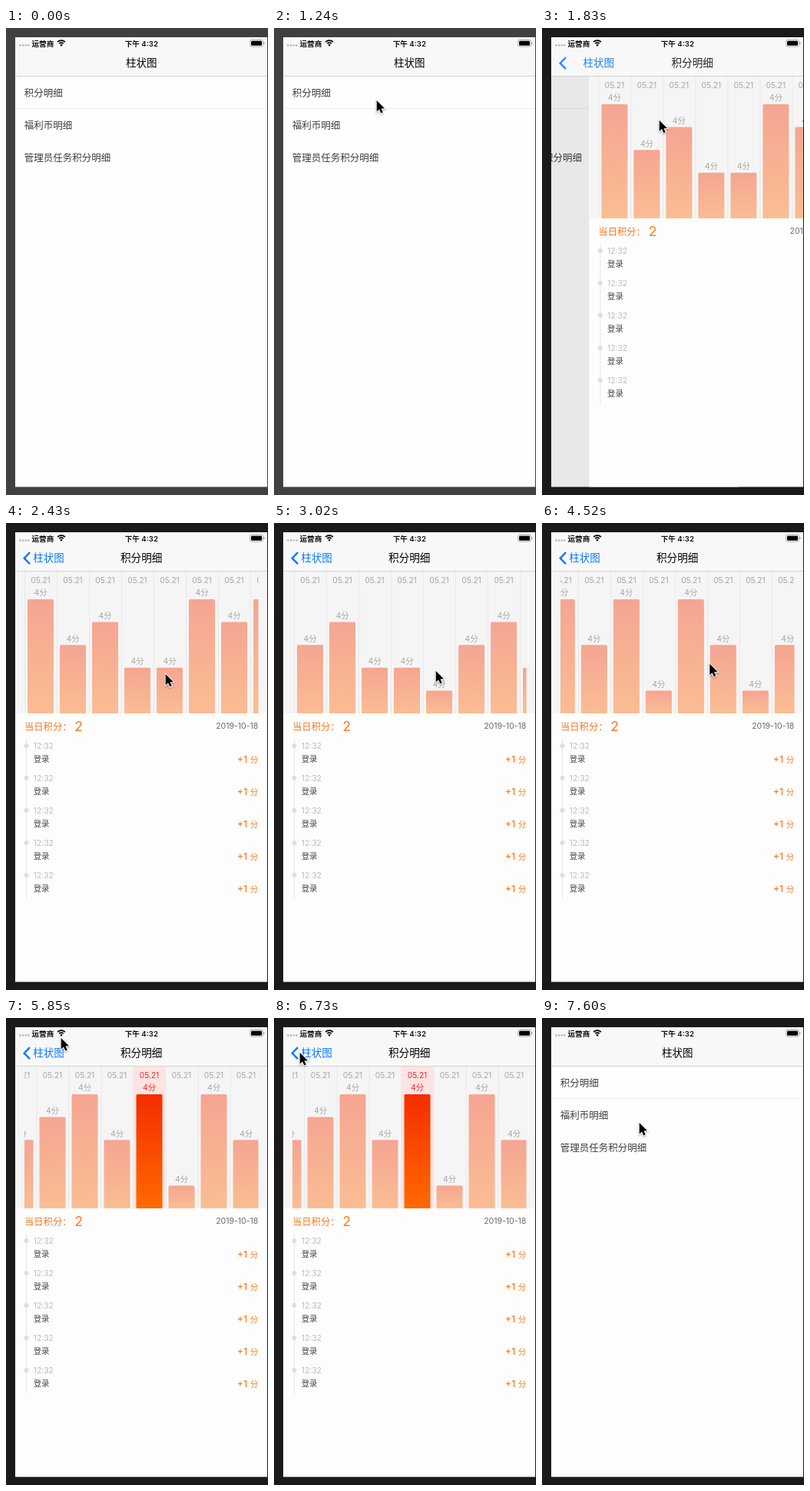
These frames come from a looping animation (341 px wide and 606 px high, 8 s). An HTML page with a canvas:

```html
<!DOCTYPE html>
<html lang="zh-CN">
<head>
<meta charset="utf-8">
<style>
html, body { margin: 0; width: 100%; height: 100%; overflow: hidden; background: #404040; }
canvas { display: block; width: 341px; height: 606px; }
</style>
</head>
<body>
<canvas id="stage"></canvas>
<script>
const W = 341, H = 606, LOOP = 8000;
const FONT = 'Inter, "Noto Sans CJK SC", "Noto Sans CJK", sans-serif';
const BLUE = '#0a7aff', ORANGE = '#fb7a1e';
const canvas = document.getElementById('stage');
const ctx = canvas.getContext('2d');
const dpr = window.devicePixelRatio || 1;
canvas.width = W * dpr;
canvas.height = H * dpr;

// Keyframes: [step, values...]; the picture advances in steps of 148 ms
const cursorKeys = [
  [0, 322, 112], [5, 133, 93], [8, 133, 93], [11, 190, 170], [13, 207, 195], [15, 207, 195],
  [17, 210, 191], [19, 130, 188], [20, 240, 188], [23, 152, 185], [28, 234, 181], [29, 234, 181],
  [32, 195, 180], [34, 195, 180], [36, 71, 25], [39, 45, 38], [41, 33, 44], [44, 33, 44], [48, 126, 135]
];
const scrollKeys = [[14, 0], [17, 334], [21, 800], [23, 1018], [24, 1005], [28, 698.5]];
const pushKeys = [[7, 0], [8, .3], [9, .85], [10, 1], [44, 1], [45, .75], [46, .15], [47, 0]];
const DARKEN = 7, SELECT = 34, PICKED = 20;
const levels = '5342254534221342345351531342435';

function tween(keys, k) {
  if (k <= keys[0][0]) return keys[0].slice(1);
  const n = keys.findIndex(key => key[0] >= k);
  if (n < 0) return keys[keys.length - 1].slice(1);
  const a = keys[n - 1], b = keys[n], f = (k - a[0]) / (b[0] - a[0]);
  return a.slice(1).map((v, i) => v + (b[i + 1] - v) * f);
}

function rect(x, y, w, h, color) {
  ctx.fillStyle = color;
  ctx.fillRect(x, y, w, h);
}

function text(str, x, y, size, color, align = 'left', weight = 400) {
  ctx.font = `${weight} ${size}px ${FONT}`;
  ctx.textAlign = align;
  ctx.fillStyle = color;
  ctx.fillText(str, x, y);
}

function dot(x, y, r, color) {
  ctx.fillStyle = color;
  ctx.beginPath();
  ctx.arc(x, y, r, 0, 7);
  ctx.fill();
}

function clipped(x, y, w, h, paint) {
  ctx.save();
  ctx.beginPath();
  ctx.rect(x, y, w, h);
  ctx.clip();
  paint();
  ctx.restore();
}

function faded(alpha, paint) {
  ctx.save();
  ctx.globalAlpha = alpha;
  paint();
  ctx.restore();
}

function drawStatus() {
  for (let i = 0; i < 4; i++) dot(18.3 + i * 3.7, 22.5, 1.3, '#b4b4b4');
  text('运营商', 33.5, 23.5, 9.6, '#111', 'left', 700);
  text('下午 4:32', 176.3, 23.5, 9.6, '#111', 'center', 600);
  ctx.strokeStyle = '#000';
  ctx.lineWidth = 1.7;
  for (const r of [3.9, 6.9]) {
    ctx.beginPath();
    ctx.arc(72, 23, r, -2.36, -.78);
    ctx.stroke();
  }
  ctx.fillStyle = '#000';
  ctx.beginPath();
  ctx.moveTo(72, 24);
  ctx.arc(72, 23.5, 2.3, -2.36, -.78);
  ctx.fill();
  ctx.strokeStyle = '#a2a2a2';
  ctx.lineWidth = .9;
  ctx.beginPath();
  ctx.roundRect(317.5, 15.3, 17, 8.8, 2.4);
  ctx.stroke();
  ctx.fillStyle = '#000';
  ctx.beginPath();
  ctx.roundRect(319, 16.7, 14, 6, 1.2);
  ctx.fill();
  rect(335.4, 18.2, 1.1, 3, '#a2a2a2');
}

function drawNav(p) {
  rect(12, 12, 328, 51, '#f8f8f8');
  rect(12, 62, 328, 1, '#d4d4d5');
  drawStatus();
  // The list title glides into the back button
  const titleX = 156 + (35.3 - 156) * p;
  faded(1 - p, () => text('柱状图', titleX, 50.2, 13.5, '#000', 'left', 500));
  faded(p, () => {
    text('柱状图', titleX, 50.2, 13.5, BLUE);
    text('积分明细', 176.2 + (1 - p) * 130, 50.2, 13.6, '#000', 'center', 500);
    ctx.strokeStyle = BLUE;
    ctx.lineWidth = 2.4;
    ctx.beginPath();
    ctx.moveTo(31, 38.2);
    ctx.lineTo(23.7, 45.7);
    ctx.lineTo(31, 53.2);
    ctx.stroke();
  });
}

function drawList() {
  rect(12, 63, 329, 533, '#fefefe');
  rect(12, 104, 329, 1, '#efefef');
  ['积分明细', '福利币明细', '管理员任务积分明细'].forEach((label, i) =>
    text(label, 23.7, 88.6 + i * 42, 12.5, '#3c3c3c'));
}

function drawColumn(i, scroll, picked) {
  const x = 24 + i * 42 - scroll, h = levels[i] * 29.6, top = 247 - h;
  rect(x, 63, 42, 184, picked ? '#fee3e2' : '#f5f5f5');
  rect(x, 63, 1, 184, '#e9e9e9');
  const color = picked ? '#e0302c' : '#a6a6a6';
  text('05.21', x + 21, 77.8, 10.2, color, 'center');
  text('4分', x + 21, top - 4.6, 10.4, color, 'center');
  const fill = ctx.createLinearGradient(0, top, 0, 247);
  fill.addColorStop(0, picked ? '#f52d00' : '#f5a592');
  fill.addColorStop(1, picked ? '#ff6a00' : '#fabd93');
  ctx.fillStyle = fill;
  ctx.beginPath();
  ctx.roundRect(x + 4, top, 34, h, [1.5, 1.5, 0, 0]);
  ctx.fill();
}

function drawDetail(scroll, selected) {
  rect(12, 63, 329, 533, '#fdfdfd');
  rect(12, 63, 329, 184, '#f5f5f5');
  clipped(24, 63, 304.5, 184, () => {
    const end = 24 + levels.length * 42 - scroll;
    rect(end, 63, 305, 184, '#e2e2e2');
    for (let i = 0; i < levels.length; i++) drawColumn(i, scroll, selected && i === PICKED);
  });
  text('当日积分：', 24, 269.2, 12.3, ORANGE);
  text('2', 89.3, 269.6, 17.5, ORANGE);
  text('2019-10-18', 328.3, 266.8, 10.5, '#6c6c6c', 'right');
  rect(26, 280, 1, 208, '#e6e6e6');
  for (let i = 0; i < 5; i++) {
    const y = 289 + i * 42;
    dot(26.5, y, 3, '#dedede');
    text('12:32', 35.7, y + 3.6, 10.3, '#bcbcbc');
    text('登录', 35.7, y + 21, 10.4, '#444');
    text('+1', 314, y + 22, 12.3, ORANGE, 'right', 500);
    text('分', 328.2, y + 21.7, 10.4, ORANGE, 'right');
  }
}

function drawCursor(x, y) {
  const shape = [[0, 0], [0, 14.4], [3.3, 11.4], [5.6, 16.6], [8, 15.6], [5.8, 10.5], [10.3, 10.3]];
  ctx.save();
  ctx.translate(x + .7, y + 1);
  ctx.beginPath();
  shape.forEach(point => ctx.lineTo(...point));
  ctx.closePath();
  ctx.shadowColor = 'rgba(0,0,0,.35)';
  ctx.shadowBlur = 2 * dpr;
  ctx.shadowOffsetY = dpr;
  ctx.strokeStyle = '#fff';
  ctx.lineWidth = 2;
  ctx.stroke();
  ctx.shadowColor = 'transparent';
  ctx.fillStyle = '#000';
  ctx.fill();
  ctx.restore();
}

function draw(ms) {
  const k = Math.floor((ms - 496) / 148);
  const [p] = tween(pushKeys, k);
  const [scroll] = tween(scrollKeys, k);
  ctx.setTransform(dpr, 0, 0, dpr, 0, 0);
  rect(0, 0, W, H, k < DARKEN ? '#404040' : '#1a1a1a');
  clipped(12, 12, 328, 583.5, () => {
    if (p < 1) {
      ctx.save();
      ctx.translate(-p * 99, 0);
      drawList();
      ctx.restore();
    }
    if (p > 0) {
      if (p < 1) rect(12, 63, 329, 533, `rgba(0,0,0,${.1 * p})`);
      ctx.save();
      ctx.translate((1 - p) * 329, 0);
      drawDetail(scroll, k >= SELECT);
      ctx.restore();
    }
    drawNav(p);
  });
  if (k >= 0) drawCursor(...tween(cursorKeys, k));
}

const start = performance.now();
function frame() {
  draw((performance.now() - start) % LOOP);
  requestAnimationFrame(frame);
}
frame();
</script>
</body>
</html>
```
